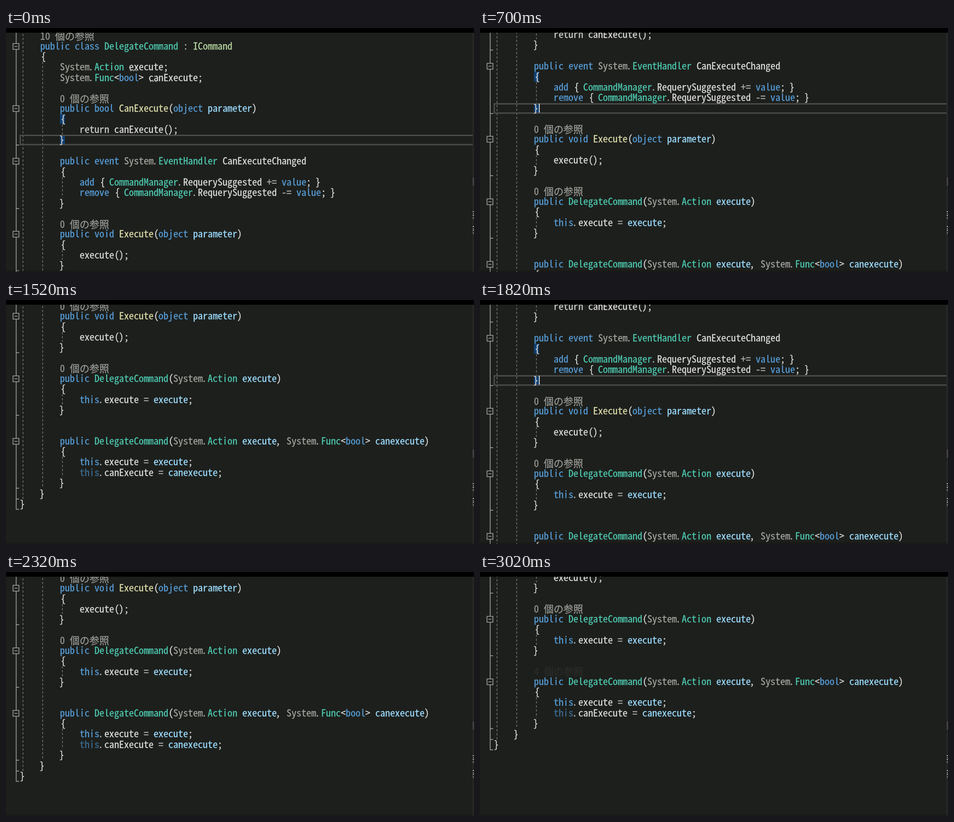
Write an HTML page that moves like this. It is 1033x542 px and loops after 3.12 s.

```html
<!DOCTYPE html>
<html lang="ja">
<head>
<meta charset="utf-8">
<title>Code editor scrolling</title>
<style>
  html, body { margin: 0; width: 100%; height: 100%; overflow: hidden; background: #1d1f1c; }
  svg { display: block; width: 1033px; height: 542px; }
  text { font-family: "Noto Sans Mono CJK JP", "Noto Sans Mono", "DejaVu Sans Mono", monospace; color: #dcdcdc; }
  tspan { fill: currentColor; stroke: currentColor; stroke-width: .3; }
  .lens { color: #999a96; }
  .keyword { color: #569cd6; }
  .dim { color: #3c6c90; }
  .space { color: #a3a49f; }
  .type { color: #4ec9b0; }
  .iface { color: #b8d7a3; }
  .method { color: #dcdcaa; }
  .param { color: #9cdcfe; }
  .flow { color: #cfcfcf; }
  .op { color: #b4b4b4; }
  .guide { stroke: #7d7e7b; stroke-width: 1.4; stroke-dasharray: 5 4; }
  .fold { stroke: #a4a5a2; stroke-width: 1.6; fill: #1d1f1c; }
  .current { fill: none; stroke: #4b4c4a; stroke-width: 3; }
  .brace { fill: #0f4173; }
</style>
</head>
<body>
<svg viewBox="0 0 1033 542">
  <defs><clipPath id="view"><rect y="10" width="1030" height="532"/></clipPath></defs>
  <rect width="1033" height="542" fill="#1d1f1c"/>
  <g clip-path="url(#view)"><g id="doc"></g></g>
  <rect width="1033" height="10.5" fill="#000"/>
  <rect y="538" width="1033" height="4" fill="#000" opacity=".15"/>
  <path d="M1031 11V542" stroke="#393a38"/>
  <path d="M1031.5 332V350" stroke="#555" stroke-width="2"/>
  <path d="M1031.5 407V424M1031.5 440V457" stroke="#c8c8c8" stroke-width="2.4" stroke-dasharray="2 3 1 2"/>
</svg>
<script>
// "@n" is a reference count, "~" marks a parameter, "!" a greyed-out keyword.
const source = `    @10
    public class DelegateCommand : ICommand
    {
        System.Action execute;
        System.Func<bool> canExecute;

        @0
        public bool CanExecute(object ~parameter)
        {
            return canExecute();
        }

        public event System.EventHandler CanExecuteChanged
        {
            add { CommandManager.RequerySuggested += value; }
            remove { CommandManager.RequerySuggested -= value; }
        }

        @0
        public void Execute(object ~parameter)
        {
            execute();
        }

        @0
        public DelegateCommand(System.Action ~execute)
        {
            this.execute = ~execute;
        }

        @4
        public DelegateCommand(System.Action ~execute, System.Func<bool> ~canexecute)
        {
            this.execute = ~execute;
            !this.canExecute = ~canexecute;
        }
    }
}`;

const CELL = 10.875, LEFT = 32.1, LINE = 23.4, LENS = 21.65, LOOP = 3120;
const colX = col => LEFT + col * CELL;

const styles = {
  keyword: "public class bool object event add remove void this value",
  type: "DelegateCommand Action Func EventHandler CommandManager",
  method: "CanExecute Execute",
  iface: "ICommand",
  space: "System",
  flow: "return",
  op: "+ - = : ."
};
const styleOf = {};
for (const name in styles) for (const word of styles[name].split(" ")) styleOf[word] = name;

// Brackets and stops sit off the middle of their cell.
const nudge = { "{": 2, "(": 0.5, "}": -1.5, ")": -0.5, ".": -2.5, ",": -2.5 };

const doc = document.getElementById("doc");

function add(tag, attrs, parent = doc, content = "") {
  const el = document.createElementNS("http://www.w3.org/2000/svg", tag);
  for (const key in attrs) el.setAttribute(key, attrs[key]);
  el.textContent = content;
  parent.append(el);
  return el;
}

const pen = document.createElement("canvas").getContext("2d");
pen.font = '100px "Noto Sans Mono CJK JP", "Noto Sans Mono", "DejaVu Sans Mono", monospace';
const fontSize = CELL * 100 / pen.measureText("0").width;

// Rows are placed on whole pixels.
let center = 40 - (LINE + LENS) / 2, last = 0;
const lines = source.split("\n").map(text => {
  const height = text.includes("@") ? LENS : LINE;
  if (last) center += (last + height) / 2;
  last = height;
  return { text, y: Math.floor(center + 0.01), indent: text.search(/\S/) };
});

const guide = (col, from, to) =>
  add("path", { class: "guide", d: `M${colX(col) + 5.4} ${from}V${to}` });

function makeCursorLine(open, close) {
  const group = add("g", {});
  for (const row of [open, close])
    add("rect", { class: "brace", x: colX(8), y: row - 11, width: CELL, height: 22 }, group);
  add("rect", { class: "current", x: 31.5, y: close - 9.5, width: 1010, height: 20.5 }, group);
  return group;
}

function drawLens({ text, y, indent }) {
  const count = text.trim().slice(1);
  const el = add("text", { class: "lens", y: y + 9.2, "font-size": fontSize });
  add("tspan", { x: colX(indent) }, el, count);
  add("tspan", { x: colX(indent + count.length + 1), "font-size": CELL * 2 }, el, "個の参照");
  return el;
}

function drawCode({ text, y }) {
  const el = add("text", { y: y + 7.5, "font-size": fontSize });
  let marks = 0;
  for (const { 0: token, index } of text.matchAll(/[~!]?\w+|[^\s\w]/g)) {
    const mark = /^[~!]/.test(token);
    const word = mark ? token.slice(1) : token;
    const style = mark ? (token[0] === "~" ? "param" : "dim") : styleOf[word] || "";
    add("tspan", { x: colX(index - marks) + (nudge[word] || 0), class: style }, el, word);
    if (mark) marks++;
  }
}

// Outline margin
const end = lines[lines.length - 1];
add("path", { class: "fold", d: `M22.5 0V${end.y + 12}` });
for (const { text, y } of lines) {
  if (text.includes("public"))
    add("path", { class: "fold", d: `M15.5 ${y - 5.5}h13v13h-13zM18.5 ${y + 1}h7` });
  if (text.trim() === "}") add("path", { class: "fold", d: `M22 ${y + 12}h7` });
}

// Indent guides and brace pairs
const braces = indent => lines.filter(l => l.indent === indent && /^[{}]$/.test(l.text.trim()));
const [classOpen, classClose] = braces(4);
guide(0, 4, classClose.y + 12);
guide(4, classOpen.y + 12, classClose.y - 12);
const members = braces(8);
for (let i = 0; i < members.length; i += 2)
  guide(8, members[i].y + 12, members[i + 1].y - 12);

const firstCursor = makeCursorLine(members[0].y, members[1].y);
const nextCursor = makeCursorLine(members[2].y, members[3].y);

let ghost;
for (const line of lines) {
  if (line.text.includes("@")) ghost = drawLens(line);
  else drawCode(line);
}

// Suggestion dots under the two fields
for (const [row, col] of [[3, 22], [4, 26]])
  for (let i = 0; i < 3; i++)
    add("rect", { x: colX(col) + 3 + i * 6, y: lines[row].y + 7.5, width: 2.2, height: 2.2, fill: "#c4c4c4" });

const caret = add("rect", { x: 130, y: members[3].y - 10, width: 1.8, height: 20, fill: "#e4e4e4" });

// Time in ms and scroll position in wheel notches
const steps = [
  [0, 0], [400, 0], [500, 1], [600, 2], [700, 3], [800, 4],
  [1000, 6], [1100, 5], [1200, 3], [1300, 2], [1420, 4], [1520, 6],
  [1620, 5], [1720, 4], [1820, 3], [1920, 2], [2020, 1], [2140, 3],
  [2220, 5], [2320, 6], [2440, 8],
  [2620, 9], [2720, 10], [2820, 9], [2920, 8], [3020, 7]
];
const show = (el, on) => el.setAttribute("opacity", +on);

function draw() {
  const t = performance.now() % LOOP;
  const notch = steps.filter(s => s[0] <= t).pop()[1];
  doc.setAttribute("transform", `translate(0 ${-Math.round(70.3 * notch + 0.3)})`);
  show(firstCursor, t < 400);
  show(nextCursor, t >= 400);
  show(caret, (t >= 400 && t < 1000) || (t >= 1520 && t < 1920));
  show(ghost, t >= 3020 ? 0.1 : 0);
  requestAnimationFrame(draw);
}
draw();
</script>
</body>
</html>
```
